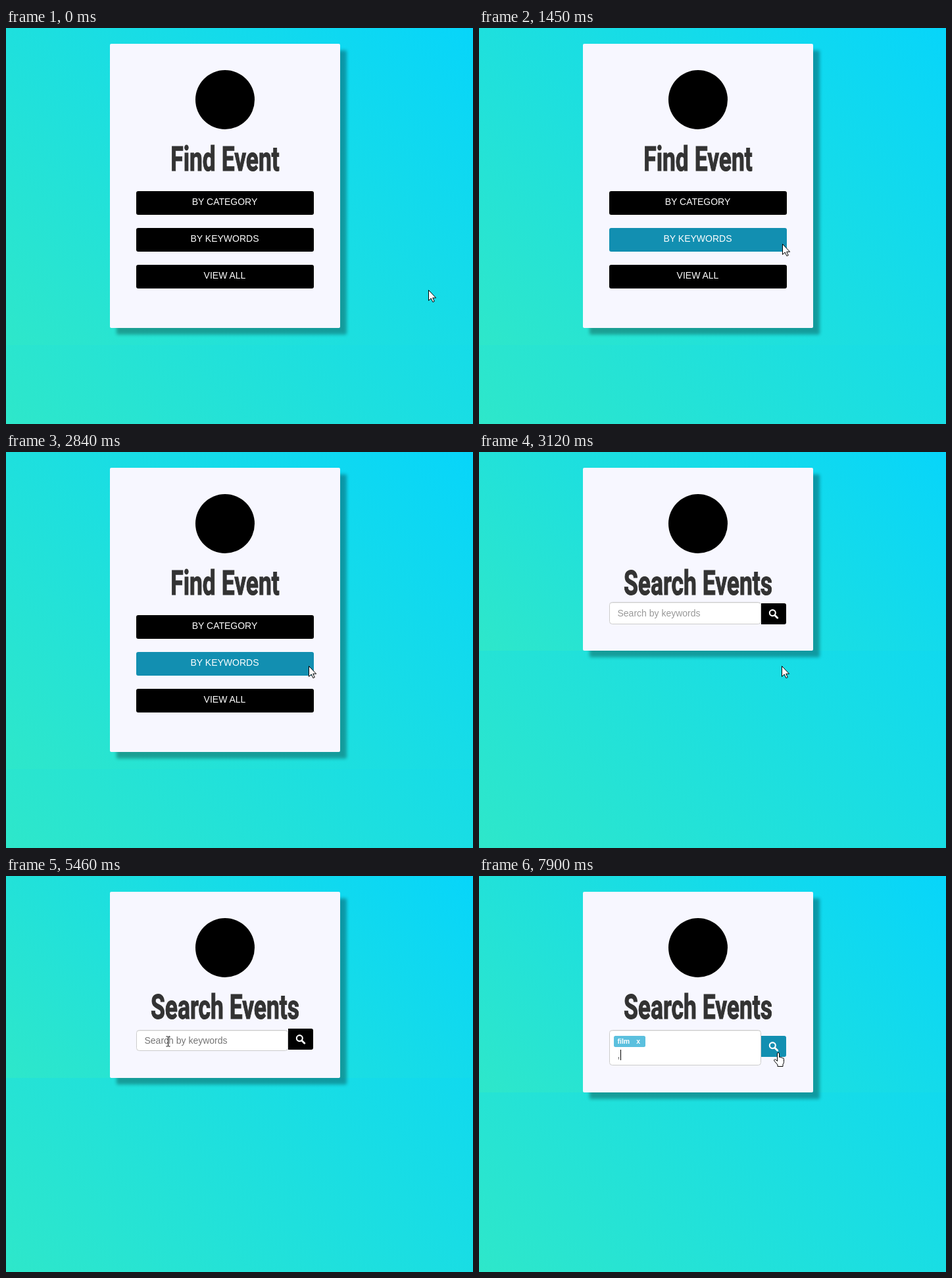
Animation, 710 px wide and 602 px high, one loop 8 s. Source, as an HTML page:

```html
<!DOCTYPE html>
<html lang="en">
<head>
<meta charset="utf-8">
<title>Find Event</title>
<style>
  html, body { margin: 0; width: 100%; height: 100%; overflow: hidden; }
  #stage { position: relative; width: 710px; height: 602px; overflow: hidden; }
  #stage, #page { background: linear-gradient(45deg, #2ee7ca, #07d5fa); }
  #page { position: absolute; left: 0; top: 0; width: 710px; }
  #card { position: absolute; left: 158px; top: 24px; width: 350px; border-radius: 2px;
    background: #f7f7ff; box-shadow: 10px 10px 5px rgba(0, 0, 0, .3); }
  svg { position: absolute; left: 0; top: 0; }
  text { font: 14px "Liberation Sans", Arial, sans-serif; white-space: pre; }
  .title { font: 700 52.5px Roboto, "Open Sans", sans-serif; fill: #333; stroke: #333;
    stroke-width: 1.2; text-anchor: middle; }
  .label { fill: #fff; text-anchor: middle; }
  .tag { font-weight: 700; font-size: 10.5px; fill: #fff; }
</style>
</head>
<body>
<div id="stage">
  <div id="page"></div>
  <div id="card"></div>
  <svg width="710" height="602" viewBox="0 0 710 602">
    <defs>
      <linearGradient id="press" x2="0" y2="1">
        <stop offset="0" stop-opacity=".25"/>
        <stop offset=".2" stop-opacity=".08"/>
        <stop offset="1" stop-opacity=".06"/>
      </linearGradient>
    </defs>
    <circle cx="333" cy="109" r="45"/>
    <g transform="translate(333 217) scale(.675 1)"><text id="title" class="title"></text></g>

    <g id="menu"></g>

    <g id="search">
      <rect id="field" x="198.5" width="230" rx="4" fill="#fff" stroke="#ccc"/>
      <path id="fieldShade" d="M201 1.5H427" stroke="#000" stroke-opacity=".07"/>
      <text id="typed" x="210.5"></text>
      <g id="tag">
        <rect x="205" y="243" width="48" height="17" rx="2.5" fill="#5bc0de"/>
        <text class="tag" x="210.5" y="255">film</text>
        <text class="tag" x="239.3" y="255">x</text>
      </g>
      <path id="caret" stroke="#000"/>
      <g id="go">
        <path id="goBox" d="M429 0h35a3 3 0 0 1 3 3v26a3 3 0 0 1-3 3h-35z"/>
        <g fill="none" stroke="#fff">
          <circle cx="446.3" cy="14.6" r="4.5" stroke-width="2.1"/>
          <path d="M449.8 18.2l4 4" stroke-width="2.8" stroke-linecap="round"/>
        </g>
      </g>
    </g>

    <g id="pointer" stroke-linejoin="round">
      <path id="arrow" d="M.5.5V16.4L4.2 13l2.7 5.6 2.4-1.1-2.6-5.3h4.9z" fill="#fff" stroke="#000"/>
      <path id="beam" d="M-3-7.5h2.2l.8.7.8-.7H3M-3 7.5h2.2l.8-.7.8.7H3M0-6.8V6.8" fill="none" stroke="#000"/>
      <path id="hand" d="M5.5 13.5V2q0-1.5 1.5-1.5T8.5 2v5.5q1.3-1 2.5.6 1.4-.8 2.4.7 2.1-.4 2.1 1.7v4q0 2-1.5 4v3h-8v-2.5L1 13.2q-.9-1.7.6-2.4 1.2-.3 2.2 1z" fill="#fff" stroke="#000"/>
    </g>
  </svg>
</div>
<script>
const LOOP = 8000;
const TEAL = "#128fb1";
const el = id => document.getElementById(id);
const set = (id, attrs) => {
  for (const name in attrs) el(id).setAttribute(name, attrs[name]);
};
const show = (id, on) => set(id, { display: on ? "inline" : "none" });
const between = (t, from, to) => t >= from && t < to;
// Last entry of a time-ordered list that has begun.
const current = (list, t) => list.filter(entry => entry[0] <= t).pop();

// time, shape, x, y
const pointerSteps = [
  [0, "arrow", 642, 398], [400, "arrow", 613, 384], [530, "arrow", 572, 362],
  [670, "arrow", 535, 351], [820, "arrow", 506, 346], [950, "arrow", 478, 343],
  [1090, "arrow", 470, 336], [1210, "arrow", 465, 331], [1330, "arrow", 462, 329],
  [1450, "arrow", 461, 328], [2470, "arrow", 460, 325],
  [3710, "arrow", 384, 291], [3840, "beam", 289.5, 259], [3980, "beam", 245.5, 239],
  [4140, "beam", 245.5, 246], [4260, "beam", 245.5, 251], [5030, "beam", 246.5, 251.5],
  [6430, "hand", 242, 252], [7360, "arrow", 292, 268], [7480, "arrow", 353, 286],
  [7630, "arrow", 391, 274], [7750, "beam", 427.5, 269], [7900, "hand", 448, 268]
];

// time, page height, card bottom, field top, field height, button top
const layouts = [
  [0, 482, 456, 0, 0, 0],
  [3120, 302, 302, 228, 34, 230],
  [3270, 307, 307, 234, 32, 232],
  [6430, 329, 329, 234, 54, 243]
];

// time, text, colour
const HINT = "Search by keywords";
const entries = [
  [0, HINT, "#999"], [3270, HINT, "#757575"], [5580, "f", "#555"], [5700, "fi", "#555"],
  [5860, "fil", "#555"], [6170, "film", "#555"], [6430, ",", "#555"]
];

// time, x
const caretSteps = [
  [0, 0], [4720, 211.5], [5150, 0], [5580, 214.5], [5700, 218.5], [5860, 221.5],
  [6170, 233.5], [6430, 215.5], [6970, 0], [7480, 215.5]
];

el("menu").innerHTML = ["BY CATEGORY", "BY KEYWORDS", "VIEW ALL"].map((label, i) => {
  const y = 248 + 56 * i;
  return `<rect id="item${i}" x="198" y="${y}" width="270" height="36" rx="3"/>` +
    (i === 1 ? `<rect id="pressed" x="198" y="${y}" width="270" height="36" rx="3" fill="url(#press)"/>` : "") +
    `<text class="label" x="332.5" y="${y + 21}">${label}</text>`;
}).join("");

function draw(t) {
  const searching = t >= 3120;
  const [, pageHeight, cardBottom, fieldTop, fieldHeight, goTop] = current(layouts, t);
  el("page").style.height = pageHeight + "px";
  el("card").style.height = cardBottom - 24 + "px";
  el("title").textContent = searching ? "Search Events" : "Find Event";

  show("menu", !searching);
  set("item1", { fill: t >= 1210 ? TEAL : "#000" });
  show("pressed", between(t, 2590, 2840));

  show("search", searching);
  set("field", { y: fieldTop + .5, height: Math.max(0, fieldHeight - 1) });
  set("fieldShade", { transform: `translate(0 ${fieldTop})` });
  set("go", { transform: `translate(0 ${goTop})` });
  set("goBox", { fill: t >= 7900 ? TEAL : "#000" });

  const tagged = t >= 6430;
  const [, text, colour] = current(entries, t);
  el("typed").textContent = text;
  set("typed", { y: tagged ? 277 : fieldTop + (t < 3270 ? 22 : 21), fill: colour });
  show("tag", tagged);

  const caretX = current(caretSteps, t)[1];
  show("caret", caretX > 0);
  set("caret", { d: `M${caretX} ${tagged ? 264 : 242}v16` });

  const [, shape, x, y] = current(pointerSteps, t);
  set("pointer", { transform: `translate(${x} ${y})` });
  for (const id of ["arrow", "beam", "hand"]) show(id, id === shape);
}

let start;
function tick(now) {
  start ??= now;
  draw((now - start) % LOOP);
  requestAnimationFrame(tick);
}
draw(0);
requestAnimationFrame(tick);
</script>
</body>
</html>
```
